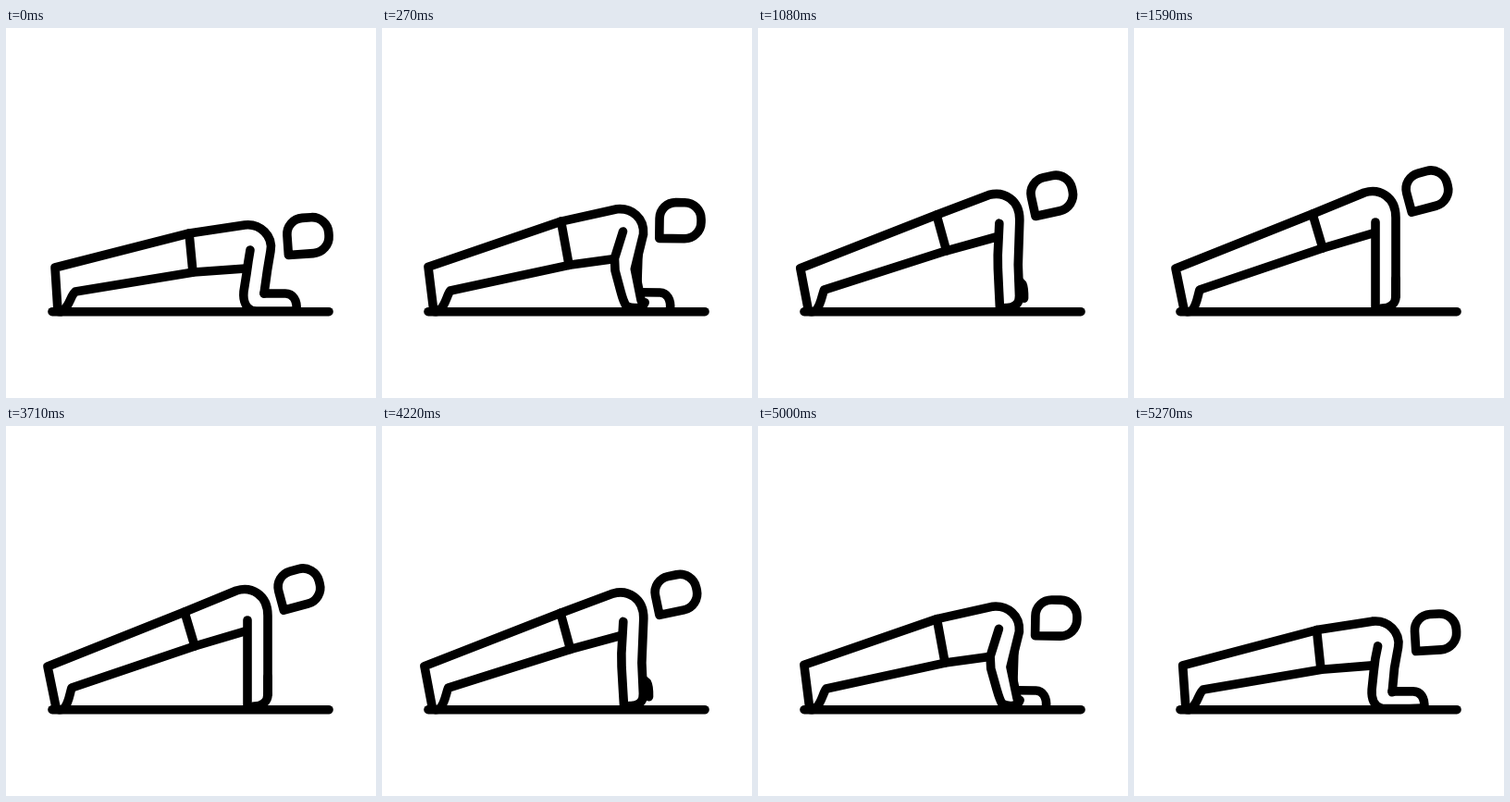
These frames come from a looping animation (400x400 px, 6.3 s). An HTML page:

```html
<!DOCTYPE html>
<html lang="en">
<head>
<meta charset="utf-8">
<title>Push-up</title>
<style>
  html, body { margin: 0; width: 100%; height: 100%; overflow: hidden; background: #fff; }
  svg { display: block; width: 100%; height: 100%; }
  path { fill: none; stroke: #000; stroke-width: 9.6; stroke-linecap: round; stroke-linejoin: round; }
  .solid { fill: #000; stroke: none; }
</style>
</head>
<body>
<svg viewBox="0 0 400 400">
  <path d="M50 306.7H349"/>
  <g id="body"></g>
  <path id="head" d="M-22 19.5V-2A17.5 17.5 0 0 1 -4.5 -19.5H5A18 18 0 0 1 23 -1.5V1.5A18 18 0 0 1 5 19.5Z"/>
</svg>
<script>
const LOOP = 6300, STEP = 30, RISE = 1590, LOWER_END = 5270;
const LIFT = 410;        // first, quick lift to the half-way pose
const BACK = 3.2;        // strength of the wind-up and overshoot
const MID_SHARE = 0.088; // how far the half-way pose leans to the top pose

// Each part: [bottom pose, half-way pose, top pose]
const parts = {
  back: [
    'M56 306L53 259L198 222L258 213C275 211 289 225 286 241L282.5 262L279 287',
    'M56 306L50 258L193 208L254 195C270 194 283 205 282 222L271 261L280 296',
    'M54 304L45 260L193 201L249 178C265 173 283 182 283 205L283 255L283 290'
  ],
  elbow: [
    'M286 241L282.5 262L279 287Z',
    'M282 222L271 261L280 296Z',
    'M283 205L283 255L283 290Z'
  ],
  belly: [
    'M56 306Q59 308 63 304C69 299 70 289 75 285L203 264L259 260',
    'M56 306Q59 308 63 304C69 299 70 289 74 284L202 257L248 251',
    'M54 304Q57 309 63 305C68 299 69 289 71 283L204 238L258 222'
  ],
  hip: ['M198 222L202 264', 'M193 208L202 257', 'M193 201L204 238'],
  innerArm: [
    'M264 240L262 252L260 266L257 285C256 296 260 304 268 306',
    'M260 218L249 249L250 262L258 285C260 290 262 296 264 300',
    'M261 210L261 245L261 260L261 285C261 290 261 296 261 303'
  ],
  palm: [
    'M268 306C285 306 300 306 314 306',
    'M264 300C271 304 279 303 280 296',
    'M268 303C278 303 283 297 283 290'
  ],
  hand: [
    'M279 287L302 287C310 287 315 294 314 305',
    'M279 287L302 287C310 287 315 294 314 305',
    'M283 271L283 275C283 278 283 282 283 290'
  ]
};
const headPoses = ['326 224.5 -4', '322 209 3', '316.5 174.7 -15'];

const body = document.getElementById('body');
const head = document.getElementById('head');
const paths = {};
for (const name in parts) {
  paths[name] = document.createElementNS(body.namespaceURI, 'path');
  if (name === 'elbow') paths[name].setAttribute('class', 'solid');
  body.append(paths[name]);
}

const easeOut = x => 1 - (1 - x) ** 2;
function easeInOutBack(x) {
  const half = v => v * v * ((BACK + 1) * v - BACK) / 2;
  return x < 0.5 ? half(2 * x) : 1 - half(2 - 2 * x);
}

const numbers = /-?\d+(\.\d+)?/g;
function blend([low, mid, high], lift, push) {
  const m = mid.match(numbers), h = high.match(numbers);
  let i = 0;
  return low.replace(numbers, l => {
    const raised = +m[i] + (h[i] - m[i]) * push;
    i++;
    return (+l + (raised - l) * lift).toFixed(2);
  });
}

function draw(time) {
  const t = Math.floor(time % LOOP / STEP) * STEP;
  // Lowering is the rise played backwards.
  const u = Math.max(0, Math.min(t, RISE, LOWER_END - t));
  const lift = easeOut(Math.min(1, u / LIFT));
  const push = MID_SHARE + (1 - MID_SHARE) * easeInOutBack(Math.max(0, (u - LIFT) / (RISE - LIFT)));
  for (const name in parts) paths[name].setAttribute('d', blend(parts[name], lift, push));
  const [x, y, angle] = blend(headPoses, lift, push).split(' ');
  head.setAttribute('transform', `translate(${x} ${y}) rotate(${angle})`);
}

const start = performance.now();
(function frame() {
  draw(performance.now() - start);
  requestAnimationFrame(frame);
})();
</script>
</body>
</html>
```
